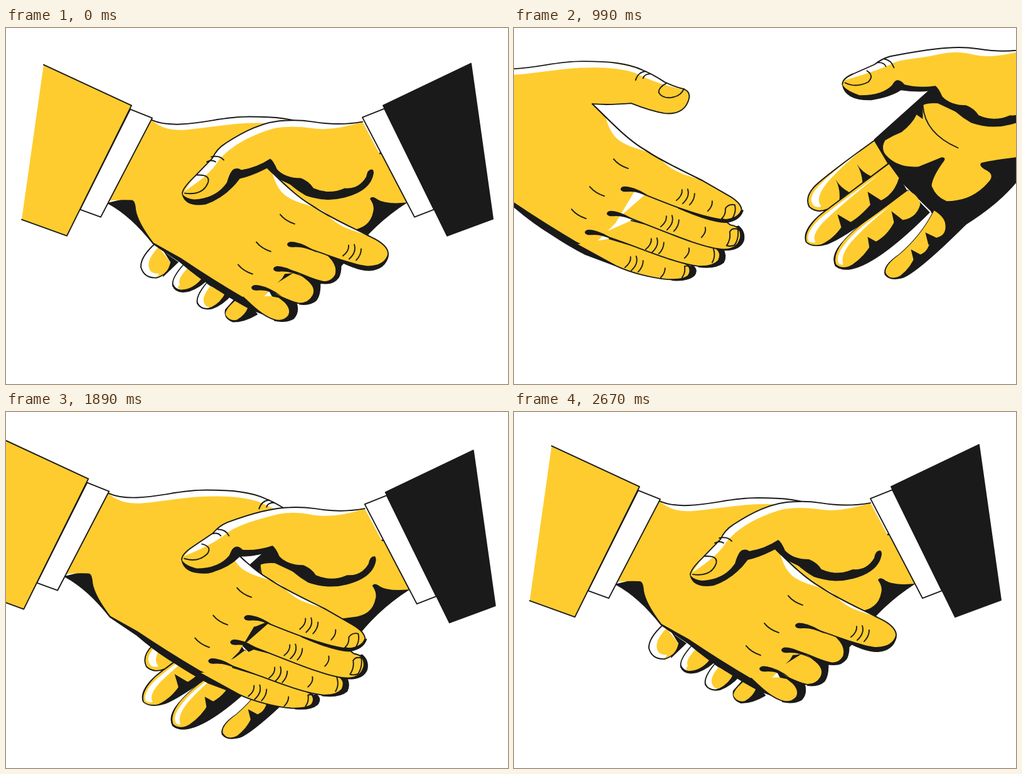
An HTML page for the animation above (2.7 s loop, 800 px wide and 568 px high).

```html
<!DOCTYPE html>
<html lang="en">
<head>
<meta charset="utf-8">
<title>Handshake</title>
<style>
  html, body { margin: 0; width: 100%; height: 100%; overflow: hidden; background: #fff; }
  svg { display: block; width: 800px; height: 568px; }
  .y { fill: #fecc2f; }
  .k { fill: #1a1a1a; }
  .w { fill: #fff; }
  .line { stroke: #1a1a1a; stroke-width: 1.9; stroke-linejoin: round; stroke-linecap: round; }
  .ink { fill: none; }
</style>
</head>
<body>
<svg viewBox="0 0 800 568">
  <defs>
    <path id="joint" class="ink line" d="M268,258Q269,267 259,275M277,257Q281,269 269,280M288,264Q288,274 280,282"/>
    <path id="blob" class="k" d="M448,346Q449,340 460,342Q477,345 496,359Q475,349 460,350Q449,351 448,346Z"/>
  </defs>

  <!-- right palm and fingers -->
  <g id="rightBack">
    <path class="k line" d="M412,216L324,295L347,333L365,360L414,408L437,452L469,430Q520,398 549,363Q585,313 638,279L600,200Z"/>
    <g id="openFingers" transform="translate(-251 118)">
      <path class="k line" d="M670,290Q650,330 615,360Q588,378 592,392Q600,403 622,396Q650,382 720,312L690,290Z"/>
      <path class="y" d="M670,290Q650,330 615,360Q590,378 593,390Q600,402 616,394Q634,380 640,361Q660,362 665,334Q690,334 688,313Q687,300 670,290Z"/>
      <path class="k" d="M633,352L638,372L648,360ZM656,325L661,345L673,333Z"/>
      <path class="k line" d="M628,258Q545,315 525,340Q505,362 513,378Q525,388 548,380Q590,365 662,293Z"/>
      <path class="y" d="M628,258Q545,315 525,340Q508,362 514,376Q525,385 540,376Q560,362 570,343Q595,333 608,305Q640,308 648,280Q645,265 628,258Z"/>
      <path class="k" d="M564,332L567,350L582,342ZM602,291L607,313L620,305Z"/>
      <path class="w" d="M600,283Q545,320 529,342Q512,362 518,374Q524,379 525,375Q520,362 538,340Q560,315 600,283Z"/>
      <path class="k line" d="M598,216Q500,286 485,300Q460,323 466,340Q476,350 500,343Q530,332 626,258L614,238Z"/>
      <path class="y" d="M598,216Q500,288 485,301Q462,324 467,340Q475,347 490,344Q510,335 524,314Q545,308 570,279Q604,272 614,238Z"/>
      <path class="k" d="M516,296L523,320L538,309ZM564,260L569,284L586,274Z"/>
      <path class="w" d="M584,231Q505,288 487,304Q465,325 470,339Q478,343 481,340Q474,330 492,310Q520,282 584,231Z"/>
      <path class="y line" d="M575,178Q500,232 481,250Q463,268 471,284Q483,295 500,288L597,215Z"/>
      <path class="k" d="M513,240Q521,256 519,273L535,261Q520,253 513,240ZM547,216Q555,230 556,246L571,236Q555,229 547,216Z"/>
      <path class="w" d="M553,195Q505,230 485,252Q467,271 479,283Q488,286 490,283Q479,271 500,245Q522,220 553,195Z"/>
    </g>
    <g id="closedFingers">
      <path class="k line" d="M350,450Q347,464 362,469Q380,469 400,457L372,425Z"/>
      <path class="y" d="M372,430Q348,449 350,458Q356,469 368,466Q382,458 386,445Z"/>
      <path class="k line" d="M320,407Q302,428 305,440Q311,451 328,448Q345,442 360,425Z"/>
      <path class="w" d="M320,408Q303,429 306,439Q311,449 324,447L336,420Z"/>
      <path class="y" d="M326,412Q311,430 316,440Q319,447 327,446Q343,438 350,422Z"/>
      <path class="k line" d="M283,378Q263,400 266,412Q272,425 292,420Q311,413 322,400Z"/>
      <path class="w" d="M283,379Q264,401 267,410Q272,420 284,417L300,390Z"/>
      <path class="y" d="M289,384Q272,402 277,410Q271,415 278,418Q298,418 312,400Z"/>
      <path class="k" d="M255,360L275,374L250,398Z"/>
      <path class="w line" d="M237,345Q214,366 215,382Q220,400 240,399Q258,394 263,374L245,345Z"/>
      <path class="y" d="M243,350Q222,372 229,386Q232,393 243,392Q245,396 236,398Q258,396 262,374Z"/>
    </g>
    <path class="y" d="M401,240Q409,236 425,237L478,262L600,200L638,279Q605,282 592,274Q583,267 580,273Q588,284 585,294Q580,320 549,323Q509,328 494,332Q490,336 499,342Q517,350 506,362Q480,393 439,393Q421,386 415,368Q417,353 434,330Q439,323 431,323Q414,330 394,338Q359,340 341,318Q334,308 341,296Q354,288 367,283Q384,270 391,255L401,262Z"/>
    <path class="ink line" d="M401,240Q404,285 457,308"/>
  </g>

  <!-- left hand -->
  <g id="left">
    <path class="k line" d="M163,280Q200,300 235,345L278,374Q308,400 338,418Q365,436 392,450L440,468L378,425L235,340L205,270Z"/>
    <path id="leftBody" class="y"/>
    <path class="w" d="M232,147Q250,165 285,163C320,160 360,152 398,152Q440,151 470,160Q505,178 548,187L516,174Q495,160 483,156Q443,142 388,142C340,142 320,153 270,154Q245,152 232,147Z"/>
    <path id="leftTop" class="ink line"/>
    <path class="ink line" transform="translate(278 89)" d="M194,83Q198,70 210,69M206,80Q208,73 218,73M243,88Q230,95 231,103Q236,112 250,111Q266,109 271,97"/>
    <g id="leftFingers"></g>
    <path class="w" d="M424,230Q432,262 452,272C475,285 500,284 512,298C528,316 545,322 577,331C545,315 515,302 488,284C460,267 440,245 424,230Z"/>
    <path class="ink line" d="M403,210C428,234 458,267 488,284C518,304 548,317 578,332"/>
    <use href="#blob"/><use href="#blob" x="-22" y="39"/><use href="#blob" x="-57" y="69"/>
    <path class="ink line" d="M437,298Q445,308 460,313M399,342Q407,352 422,357M370,378Q378,388 393,393"/>
    <use href="#joint" x="278" y="89"/>
    <g id="openDetails" transform="translate(278 89)">
      <use href="#joint" x="-25" y="42"/><use href="#joint" x="-49" y="78"/><use href="#joint" x="-82" y="107"/>
      <path class="ink line" d="M316,276Q317,284 309,292M305,318Q307,326 299,334M279,351Q281,359 272,367M241,383Q241,391 234,398M331,304Q338,298 337,288Q342,280 352,282Q355,293 348,304Q340,308 331,304M339,347Q346,337 344,325Q348,318 357,321Q359,335 352,346Q346,349 339,347M316,374Q322,364 318,352M268,398Q274,390 272,380L280,379"/>
    </g>
    <path class="w line" d="M198,130L233,144L151,302L118,290Z"/>
    <path class="y" d="M60,59L200,124L97,332L25,306Z"/>
    <path class="ink line" d="M60,59L200,124L97,332L25,306"/>
  </g>

  <!-- right thumb and sleeve -->
  <g id="rightFront">
    <path id="thumbShade" class="k line"/>
    <path class="k" d="M428,224Q450,252 478,268Q510,279 540,271Q582,260 586,232Q586,224 580,226Q570,228 560,220L450,215Z"/>
    <path id="thumb" class="y"/>
    <path id="thumbShine" class="w"/>
    <path id="thumbLines" class="ink line"/>
    <path class="w line" d="M603,129L568,143L651,302L682,290Z"/>
    <path class="k line" d="M741,57L601,124L703,332L776,305Z"/>
  </g>
</svg>
<script>
const LOOP = 2700, STEP = 30, REST = 6;
const $ = id => document.getElementById(id);
const clamp = v => Math.min(1, Math.max(0, v));

// Blends two paths that share the same commands.
function mix(a, b, k) {
  const ends = b.match(/[\d.]+/g);
  let i = 0;
  return a.replace(/[\d.]+/g, n => +(+n + (ends[i++] - n) * k).toFixed(2));
}

const leftTop = 'M232,147Q250,155 278,154C320,152 345,142 388,142C430,142 460,145 483,156Q500,163 518,175Q535,183 548,186Q560,190 557,202Q550,228 518,225Q495,221 465,209Q430,212 403,210';
$('leftTop').setAttribute('d', leftTop);
$('leftBody').setAttribute('d', leftTop + 'L480,290L470,350L440,400L400,440L378,430Q330,402 278,367L235,343Q210,310 207,290Q206,275 200,275Q185,274 164,276Z');

// Each entry: class, open path, closed path; little finger first.
const indexEdge = 'M403,210C428,234 458,267 488,284C518,304 548,317 578,332';
const fingers = [
  ['k', 'M530,480L563,468Q572,475 565,484Q555,493 530,491Z',
        'M435,433L463,440Q467,455 458,464Q445,471 428,467Z'],
  ['y', 'M430,425L530,455L555,467Q562,475 556,484Q548,491 523,490C500,488 465,480 440,468L378,434',
        'M425,428L435,430L445,438Q456,450 450,460Q443,468 433,467C420,465 405,455 390,441L378,430'],
  ['k', 'M560,450L610,439Q618,452 612,463Q600,473 573,470Z',
        'M480,395L500,402Q502,425 494,435Q485,443 468,441Z'],
  ['y', 'M465,396L580,425L601,441Q610,448 604,460Q595,470 573,469C530,464 470,435 415,418',
        'M460,390L465,390L480,402Q496,415 489,428Q482,440 468,440C450,437 430,425 415,418'],
  ['k', 'M580,425L636,405Q647,414 644,428Q638,444 612,443Q600,441 580,434Z',
        'M500,360L533,372Q535,388 530,398Q522,409 508,408Q500,408 490,402Z'],
  ['y', 'M490,352L600,385L623,403Q642,406 639,424Q634,442 613,442C580,441 520,414 450,387',
        'M490,350L500,350L515,365Q530,380 525,395Q518,407 505,405C485,402 465,388 450,387'],
  ['k', 'M540,376Q590,398 615,399Q638,396 643,380L620,390Z',
        'M520,366Q560,388 580,387Q604,385 609,364L585,378Z'],
  ['y', indexEdge + 'L618,355Q640,367 641,379Q636,394 612,395C578,391 528,372 468,347',
        indexEdge + 'L588,337Q610,349 609,362Q604,380 578,381C560,381 510,362 468,347']
].map(([shade, open, closed]) => {
  const node = document.createElementNS('http://www.w3.org/2000/svg', 'path');
  node.setAttribute('class', shade + ' line');
  $('leftFingers').append(node);
  return { node, open, closed };
});

const rootTop = 'M568,150Q530,157 489,150Q468,147 449,148';
const crease = 'Q426,212 432,226Q445,240 470,240Q483,245 490,256Q515,267 540,256Q562,258 574,238Q576,226 583,226L600,210Z';
const shineRoot = 'Q468,147 489,150Q530,157 568,150Z';
const openTop = rootTop + 'C420,149 380,156 349,162Q335,166 324,175L290,190Q273,197 273,206';
const closedTop = rootTop + 'C410,148 375,168 349,185Q336,193 329,208L300,238Q282,255 281,264';
const thumbParts = [
  ['thumbShade',
    'M273,206Q277,232 319,231Q350,226 366,215Q385,218 404,217L412,216L432,228L430,216L420,208L362,195Z',
    'M281,264Q285,286 318,281Q350,270 372,240Q390,236 410,226L418,222L432,228L430,216L420,208L362,220Z'],
  ['thumb',
    openTop + 'Q275,215 300,224Q335,225 352,208Q357,199 361,200Q366,200 372,207Q395,213 421,209' + crease,
    closedTop + 'Q284,272 300,274Q335,272 352,247Q358,226 365,225Q371,223 375,227Q400,223 421,209' + crease],
  ['thumbShine',
    'M568,150Q520,166 485,160Q455,152 430,158C400,165 370,166 355,172Q330,185 276,200L290,190L324,175Q335,166 349,162C380,156 420,149 449,148' + shineRoot,
    'M568,150Q520,166 485,160Q455,156 430,160C385,172 355,192 338,213Q325,235 284,261L300,238L329,208Q336,193 349,185C375,168 410,148 449,148' + shineRoot],
  ['thumbLines',
    openTop + 'M312,185Q324,193 314,203Q294,213 277,204M339,166Q351,168 355,180M329,172Q339,171 342,178',
    closedTop + 'M304,235Q326,234 322,247Q314,268 285,264M327,206Q340,203 347,211M320,214Q328,210 334,214']
];

// Turning points of the shake: time, height.
const shakeKeys = [[2010, REST], [2090, -8], [2430, 41], [2640, -6.5], [2895, 40], [3260, 1], [3390, REST]];
function shake(t) {
  if (t < LOOP / 2) t += LOOP;
  for (let i = 1; i < shakeKeys.length; i++) {
    const [t0, y0] = shakeKeys[i - 1], [t1, y1] = shakeKeys[i];
    if (t >= t0 && t < t1) return y0 + (y1 - y0) * (1 - Math.cos(Math.PI * (t - t0) / (t1 - t0))) / 2;
  }
  return REST;
}

function draw(t) {
  const near = Math.max(t, LOOP - t);   // leaving mirrors arriving
  const leftX = -((Math.max(0, 1995 - near) * 0.1955) ** 1.4);
  const rightX = (Math.max(0, 1894 - near) * 0.824) ** 1.1;
  const y = shake(t);
  const move = (id, x, dy) => $(id).setAttribute('transform', `translate(${x.toFixed(2)} ${dy.toFixed(2)})`);
  move('left', leftX, y + 0.341 * leftX);
  move('rightBack', rightX, y - 0.49 * rightX);
  move('rightFront', rightX, y - 0.49 * rightX);

  const grip = clamp((near - 1890) / 120);
  const bend = clamp((near - 1800) / 210);
  fingers.forEach(f => f.node.setAttribute('d', mix(f.open, f.closed, grip)));
  thumbParts.forEach(([id, open, closed]) => $(id).setAttribute('d', mix(open, closed, bend)));
  const show = (id, on) => $(id).setAttribute('display', on ? 'inline' : 'none');
  show('openDetails', grip < 0.3);
  show('openFingers', grip < 0.6);
  show('closedFingers', grip >= 0.6);
}

function tick() {
  const t = performance.now() % LOOP;
  draw(Math.floor(t / STEP) * STEP);
  requestAnimationFrame(tick);
}
tick();
</script>
</body>
</html>
```
